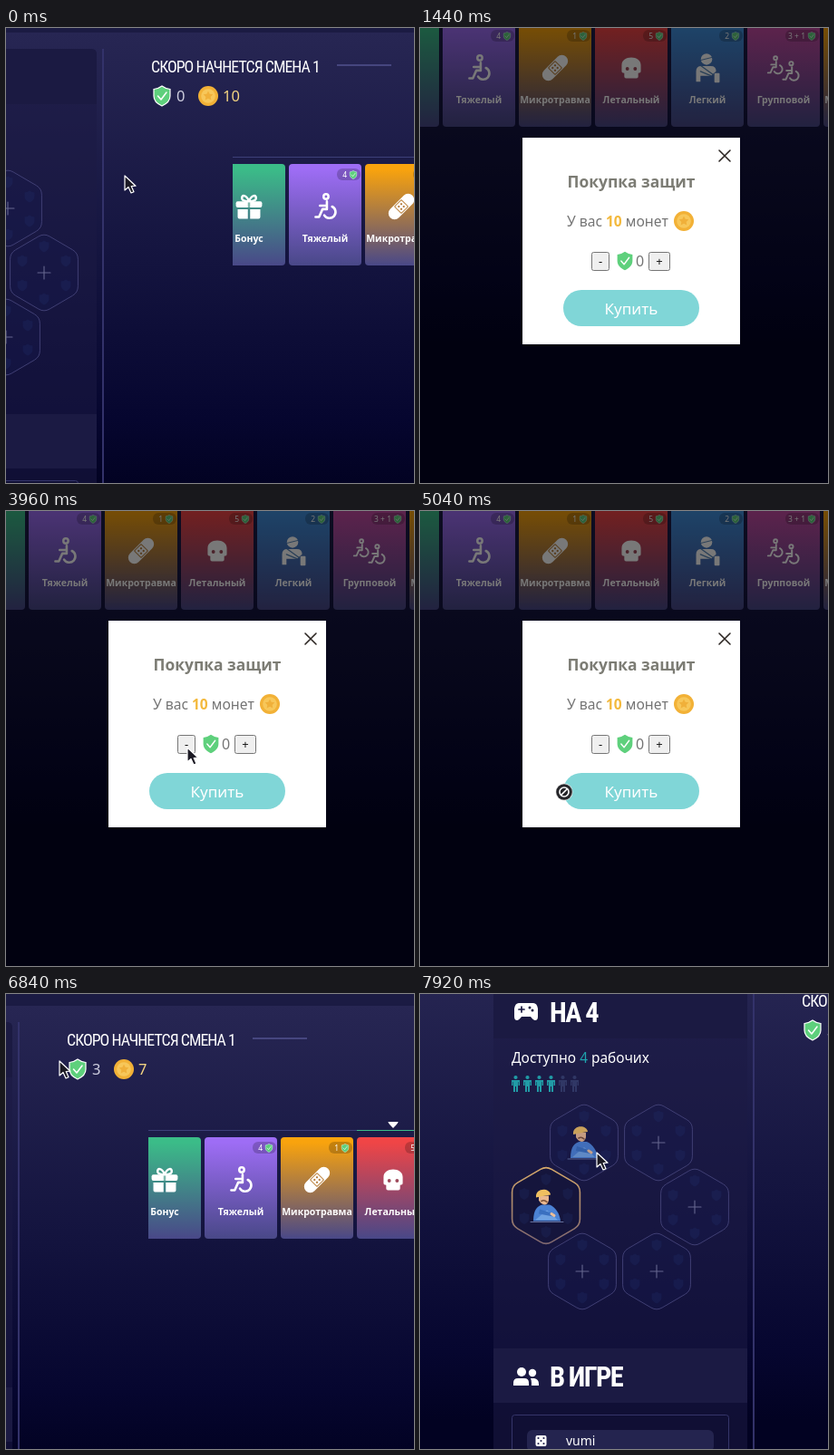
These frames come from a looping animation (450 by 502 pixels, 8 s). An HTML page:

```html
<!DOCTYPE html>
<html lang="ru">
<head>
<meta charset="utf-8">
<style>
html, body { margin: 0; width: 100%; height: 100%; overflow: hidden; background: #03031f; }
svg { display: block; width: 450px; height: 502px; }
text { font-family: Ubuntu, "Noto Sans", "Open Sans", sans-serif; fill: #fff; white-space: pre; }
.narrow { font-family: Oswald, "Roboto Condensed", "Open Sans Condensed", Roboto, sans-serif; font-stretch: 62.5%; letter-spacing: -.055em; }
.line { fill: none; stroke: #fff; stroke-linecap: round; stroke-linejoin: round; }
</style>
</head>
<body>
<svg id="stage" viewBox="0 0 450 502"></svg>
<script>
const stage = document.getElementById('stage');

// ---------- helpers ----------
const at = (x, y, body, extra = '') => `<g transform="translate(${x} ${y}) ${extra}">${body}</g>`;
const rect = (x, y, w, h, fill, r = 0, extra = '') =>
  `<rect x="${x}" y="${y}" width="${w}" height="${h}" rx="${r}" fill="${fill}" ${extra}/>`;
const dot = (x, y, r, fill) => `<circle cx="${x}" cy="${y}" r="${r}" fill="${fill}"/>`;
const path = (d, fill, extra = '') => `<path d="${d}" fill="${fill}" ${extra}/>`;
const line = (d, width, color = '#fff') => `<path class="line" d="${d}" style="stroke:${color};stroke-width:${width}"/>`;
const text = (x, y, str, size, extra = '') => `<text x="${x}" y="${y}" font-size="${size}" ${extra}>${str}</text>`;
const mid = 'text-anchor="middle"';
const bold = 'font-weight="700"';
const gradient = (id, stops, range = 'y1="0" y2="1"') => `<linearGradient id="${id}" x1="0" x2="0" ${range}>` +
  stops.map(([o, c]) => `<stop offset="${o}" stop-color="${c}"/>`).join('') + '</linearGradient>';

function roundedHex(rx, ry, cut) {
  const pts = [[0, -ry], [rx, -ry / 2], [rx, ry / 2], [0, ry], [-rx, ry / 2], [-rx, -ry / 2]];
  const toward = (a, b) => {
    const k = cut / Math.hypot(b[0] - a[0], b[1] - a[1]);
    return [a[0] + (b[0] - a[0]) * k, a[1] + (b[1] - a[1]) * k];
  };
  return pts.map((p, i) =>
    `${i ? 'L' : 'M'}${toward(p, pts[(i + 5) % 6])} Q${p} ${toward(p, pts[(i + 1) % 6])}`).join(' ') + 'Z';
}

// ---------- icons, centred on 0,0 ----------
const shieldPath = 'M0-11Q4-8 9-7.5V0C9 5.5 4.5 9 0 11C-4.5 9-9 5.5-9 0V-7.5Q-4-8 0-11Z';
const shield = (x, y, scale = 1, rim = 'none') => at(x, y,
  path(shieldPath, '#5ed07c', `stroke="${rim}" stroke-width="1.2"`) + line('M-4.5 0L-1 4L5-4', 1.5), `scale(${scale})`);

const star = Array.from({ length: 10 }, (_, i) => {
  const a = i * Math.PI / 5 - Math.PI / 2, r = i % 2 ? 2.8 : 5.6;
  return [r * Math.cos(a), r * Math.sin(a)].map(v => v.toFixed(1));
}).join(' ');
const coin = (x, y) => at(x, y, dot(0, 0, 11, '#f2b136') + dot(0, 0, 7.8, '#f7c75a') +
  `<polygon points="${star}" fill="#f0b03a"/>`);

const icons = {
  gift: rect(-15, -6, 30, 7, '#fff', 2) + path('M-13 3H-1.3V14H-11Q-13 14-13 12ZM13 3H1.3V14H11Q13 14 13 12Z', '#fff') +
    rect(-1.3, -6, 2.6, 7, '#7fb8ac') + line('M0-6C-3-14-9-14-8-9Q-7-6 0-6C3-14 9-14 8-9Q7-6 0-6', 2.6),
  wheelchair: `<circle class="line" cx="1" cy="-11.5" r="2.8" stroke-width="2.6"/>` +
    line('M2-6V3H-3L-7 12H-11M1-1H-6', 2.7) + line('M8 0A7 7 0 1 1-1 10', 2.7),
  bandage: at(0, 0, rect(-18, -7, 36, 14, '#fff', 7) + rect(-6, -6, 12, 12, '#c08a48', 1) + rect(-5, -5, 10, 10, '#fff', 1) +
    [[-2, -2], [2, -2], [-2, 2], [2, 2]].map(p => dot(...p, 1.2, '#b57c3c')).join(''), 'rotate(-45)'),
  skull: path('M-11 4V-3C-11-9-6-12 0-12S11-9 11-3V4Q11 6 8 6V10Q8 12 6 12H-6Q-8 12-8 10V6Q-11 6-11 4Z', '#fff') +
    dot(-4.5, 1, 2, '#a04a5c') + dot(4.5, 1, 2, '#a04a5c'),
  injured: dot(-1, -10, 6.5, '#fff') + line('M-7-9L5-12', 1, '#5584b8') +
    path('M-13 16V4Q-13-2-7-2H4Q10-2 10 4L4 9H-8V16Z', '#fff') + rect(8, 6, 6, 11, '#fff', 1) +
    line('M-7-2L7 8M-8 4L4 9', 1.3, '#5584b8')
};
icons.group = at(-10, -3, icons.wheelchair, 'scale(.72)') + at(8, 4, icons.wheelchair, 'scale(.78)');

const worker = path('M-15 17C-15 4-10 0-5-1L3-1C10 2 14 9 15 17Z', '#4b82d4') +
  path('M-13 16Q-6 10 0 5L6 10 12 16Z', '#6fa2e2') + path('M-8 4L8 9 7 12-9 9Z', '#3a70c0') +
  line('M5 9L8 11', 3, '#edbf98') + path('M-9-11H2V-6Q1-1-3-1Q-7-2-9-6Z', '#eab88f') +
  line('M-6-5Q-3-7 0-4', 1.6, '#7b5138') + path('M-12-9C-13-20 3-20 4-12L-2-11Z', '#f0c060') + line('M-18 18H18', 1, '#66719e');

const person = color => dot(0, 2, 2.1, color) + path('M-4.5 5H4.5V11H3V7H2.5V18H.5V12H-.5V18H-2.5V7H-3V11H-4.5Z', color);
const gamepad = path('M-8-9H8Q12-9 13-3V6Q13 10 10 10Q8 10 5 6H-5Q-8 10-10 10Q-13 10-13 6V-3Q-12-9-8-9Z', '#fff') +
  line('M-5-5V1M-8-2H-2', 1.7, '#1b1a42') + dot(4, -4, 1.5, '#1b1a42') + dot(7, -1, 1.5, '#1b1a42');
const crowd = dot(-5, -5, 5, '#fff') + path('M-14 10V7Q-14 2-9 2H-2Q3 2 3 7V10Z', '#fff') +
  dot(7, -4, 4.2, '#fff') + path('M5 2H9Q14 3 14 8V10H6V7Q6 4 5 2Z', '#fff');
const dice = rect(-6, -6, 12, 12, '#fff', 2) +
  [[-3, -3], [3, -3], [0, 0], [-3, 3], [3, 3]].map(p => dot(...p, 1.1, '#24244f')).join('');

// ---------- left panel ----------
const hexPath = roundedHex(37.4, 43.6, 7);
const hex = (x, y, body, active) => at(x, y,
  path(hexPath, active ? '#15153c' : 'rgba(22,24,76,.35)', `stroke="${active ? 'url(#gold)' : '#403f74'}" stroke-width="${active ? 1.6 : 1}"`) +
  [[-24, -13], [0, -29], [24, -13], [24, 14], [0, 29], [-24, 14]].map(([a, b]) =>
    at(a, b, path(shieldPath, '#30509a', 'opacity=".13"'), 'scale(.6)')).join('') + body);
const plus = line('M-7 0H7M0-7V7', 1.1, '#666790');

const panel = path('M81 700V-12H355Q361-12 361-6V700Z', 'rgba(28,27,68,.55)') +
  path('M81 49V-12H355Q361-12 361-6V49Z', '#1b1a42') + rect(81, 391, 280, 60, '#1b1a43') +
  rect(367, -12, 2, 720, '#33326a') +
  at(117, 19, gamepad) + text(143, 31, 'НА 4', 26, `class="narrow" ${bold} data-fit="53"`) +
  text(101, 76, 'Доступно <tspan id="free" fill="#1fa3ad">4</tspan> рабочих', 16, 'data-fit="152"') +
  Array.from({ length: 6 }, (_, i) => at(105.5 + 13 * i, 90, `<g class="slot">${person('currentColor')}</g>`)).join('') +
  hex(181, 164, `<g id="newWorker" opacity=".82">${worker}</g><g id="emptySlot">${plus}</g>`) +
  [[263, 164], [303, 235], [179, 306], [261, 306]].map(p => hex(...p, plus)).join('') +
  hex(139, 233.5, at(1, 0, worker), true) +
  at(117, 422, crowd) + text(143, 433, 'В ИГРЕ', 25, `class="narrow" ${bold} data-fit="80"`) +
  rect(101.5, 464.5, 239, 200, 'none', 3, 'stroke="#35356a"') + rect(118, 481, 206, 24, '#24244f', 6) +
  at(133.5, 493, dice) + text(161, 498, 'vumi', 14);

// ---------- cards ----------
const kinds = [
  ['Бонус', '#3bbc88', 'gift', ''], ['Тяжелый', '#9e6df5', 'wheelchair', '4'],
  ['Микротравма', '#f9a30d', 'bandage', '1'], ['Летальный', '#f04546', 'skull', '5'],
  ['Легкий', '#3f8edc', 'injured', '2'], ['Групповой', '#c24aa2', 'group', '3 + 1']
];
kinds.push(kinds[2]);
const card = ([label, , icon, price], i) => {
  const w = price.length > 1 ? 37 : 26;
  return at(489 + 84 * i, 115, rect(0, 0, 80, 112, `url(#card${i})`, 4) +
    at(40, 47, icons[icon], 'scale(.96)') + text(40, 86, label, 10.5, `${mid} ${bold}`) +
    (price && rect(79 - w, 5, w, 13, 'rgba(0,0,0,.2)', 6) + text(64, 15, price, 8.5, 'text-anchor="end"') + shield(71, 12, .42, '#cfe')));
};

const world = rect(-100, -120, 1300, 900, 'url(#sky)') + rect(-100, -120, 1300, 90, '#1b1b43') + panel +
  text(421, 13.5, 'СКОРО НАЧНЕТСЯ СМЕНА 1', 18, 'class="narrow" data-fit="186"') + rect(626, 5, 60, 2, '#46467f') +
  shield(433, 40, 1, '#fff') + text(449, 46, '', 16.5, 'id="shields" style="fill:#cfcfe0"') +
  coin(484, 40) + text(500, 46, '', 16.5, 'id="coins" style="fill:#f4d582"') +
  rect(511, 107, 600, 1, '#3d4079') + `<g id="pointer">${rect(741, 107, 80, 1, '#3bbc88')}${path('M775.5 98H786.5Q787 99 781 105Q775 99 775.5 98Z', '#fff')}</g>` +
  `<g clip-path="url(#rail)">${kinds.map(card).join('')}</g>`;

// ---------- purchase dialog ----------
const gray = 'style="fill:#747474"';
const stepButton = (x, w, sign, id) => rect(x + .5, 247.5, w - 1, 20, '#efefef', 2, `stroke="#767676" id="${id}"`) +
  text(x + w / 2, 262, sign, 13, `${mid} style="fill:#111"`);
const dialog = rect(0, 0, 450, 502, 'rgba(0,0,0,.53)') + rect(113, 121, 240, 228, '#fff') +
  line('M330 135L342 147M342 135L330 147', 1.6, '#2b2522') +
  text(233, 176, 'Покупка защит', 18, `${mid} ${bold} data-fit="141" style="fill:#7c7c74"`) +
  text(162, 219, `У вас <tspan ${bold} fill="#f3b93d">10</tspan> монет`, 16, `data-fit="112" ${gray}`) + coin(291, 213) +
  stepButton(189, 20, '-', 'minus') + shield(226, 257, .93) + text(238, 263, '0', 16, `id="count" ${gray}`) +
  stepButton(252, 24, '+', 'plus') + rect(158, 289, 150, 40, '#80d6d7', 20, 'id="buy"') +
  text(233, 316, 'Купить', 18, `${mid} data-fit="59"`);

const arrow = path('M0 0V16L4 12.5 7 19 10 17.7 7.2 11.5 12 11.2Z', '#1c1a24', 'stroke="#fff" stroke-width="1.2" stroke-linejoin="round"');
const banned = dot(0, 0, 9.5, '#e4e4e4') + dot(0, 0, 8.8, '#26262a') +
  `<circle r="5" fill="none" stroke="#fff" stroke-width="1.6"/>` + line('M-3.5 3.5L3.5-3.5', 1.6);

stage.innerHTML = '<defs>' +
  gradient('sky', [[0, '#272653'], [.5, '#14143f'], [.85, '#06062f'], [1, '#020222']],
    'y1="-30" y2="470" gradientUnits="userSpaceOnUse"') +
  gradient('gold', [[0, '#d8aa6a'], [1, '#806870']]) +
  kinds.map((k, i) => gradient('card' + i, [[.05, k[1]], [1, '#494888']])).join('') +
  '<clipPath id="rail"><rect x="511" y="100" width="700" height="140"/></clipPath></defs>' +
  `<g id="world">${world}</g><g id="dialog">${dialog}</g><g id="arrow">${arrow}</g><g id="banned">${banned}</g>`;

const $ = id => document.getElementById(id);
const show = (id, on) => { $(id).style.display = on ? '' : 'none'; };

// Choose a font size that gives each heading its natural length.
for (const el of document.querySelectorAll('[data-fit]')) {
  const size = +el.getAttribute('font-size');
  el.setAttribute('font-size', (size * el.dataset.fit / el.getComputedTextLength()).toFixed(2));
}

// ---------- timeline ----------
const views = { lobby: [-261, 35], shop: [-548, -118], bought: [-354, 43], team: [0, 0] };
// view, cursor x, cursor y, protections chosen, cursor banned
const steps = [
  ['lobby', 131, 163], ['lobby', 148, 122], ['lobby', 170, 88], ['lobby', 173, 80],
  ['shop', -50, 0, 0], ['shop', 262, 338, 0], ['shop', 266, 290, 0], ['shop', 266, 262, 1],
  ['shop', 266, 262, 1], ['shop', 236, 265, 1], ['shop', 200, 261, 1], ['shop', 200, 261, 0],
  ['shop', 230, 327, 0, true], ['shop', 192, 326, 0, true], ['shop', 159, 310, 0, true],
  ['bought', 86, 106], ['bought', 84, 102], ['bought', 78, 94], ['bought', 68, 82], ['bought', 59, 74],
  ['team', 178, 172], ['team', 178, 172], ['team', 195, 175]
];
const STEP = 360, LOOP = 8000;
let shown = -1;

function render(index) {
  const [view, x, y, count = 0, ban = false] = steps[index];
  const paid = view === 'bought' || view === 'team';
  const placed = index === steps.length - 1;
  const free = placed ? 4 : 5;
  const overPlus = x === 266 && y === 262;
  $('world').setAttribute('transform', `translate(${views[view]})`);
  show('dialog', view === 'shop');
  show('pointer', paid);
  $('shields').textContent = paid ? 3 : 0;
  $('coins').textContent = paid ? 7 : 10;
  $('count').textContent = count;
  $('buy').setAttribute('fill', count ? '#00abad' : '#80d6d7');
  $('plus').setAttribute('fill', overPlus ? '#e4e4e4' : '#efefef');
  $('plus').setAttribute('stroke', overPlus ? '#444' : '#767676');
  $('free').textContent = free;
  document.querySelectorAll('.slot').forEach((el, i) => { el.style.color = i < free ? '#219ba6' : '#303765'; });
  show('newWorker', placed);
  show('emptySlot', !placed);
  for (const id of ['arrow', 'banned']) {
    show(id, (id === 'banned') === ban);
    $(id).setAttribute('transform', `translate(${x} ${y})`);
  }
}

const start = performance.now();
function tick() {
  const index = Math.floor((performance.now() - start) % LOOP / STEP);
  if (index !== shown) render(shown = index);
  requestAnimationFrame(tick);
}
tick();
</script>
</body>
</html>
```
